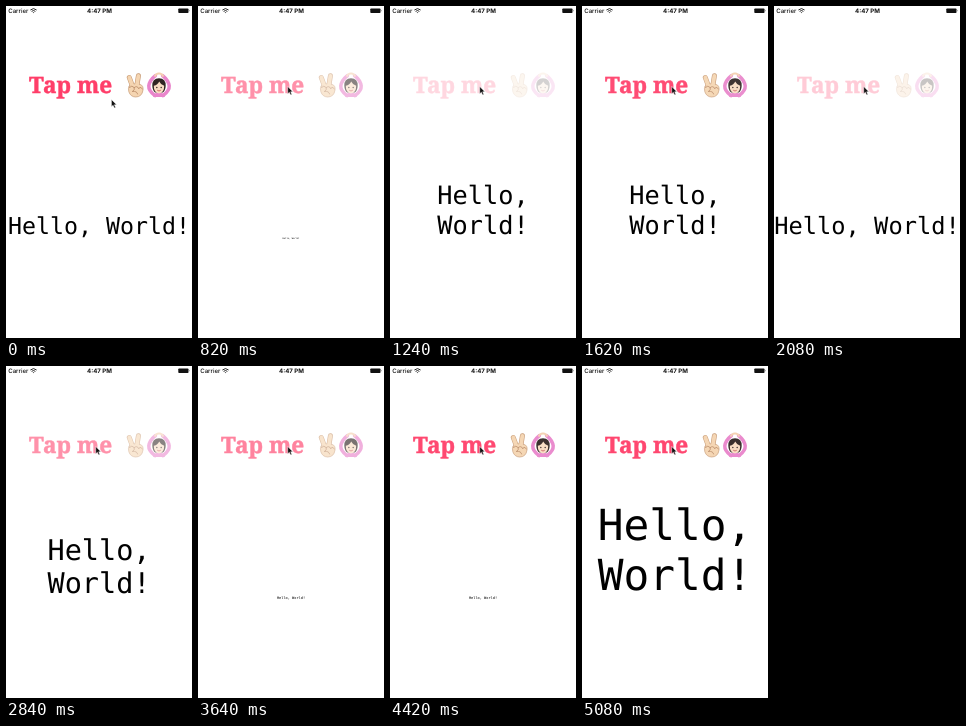
These frames come from a looping animation (186 px wide and 332 px high, 5.1 s). An HTML page:

```html
<!DOCTYPE html>
<html lang="en">
<head>
<meta charset="utf-8">
<title>Tap me</title>
<style>
  html, body { margin: 0; width: 100%; height: 100%; overflow: hidden; background: #fff; }
  svg { display: block; width: 100vw; height: 100vh; }
  text { text-rendering: geometricPrecision; }
  .status { font: 500 6.1px Inter, Roboto, sans-serif; fill: #111; }
  .time { font-weight: 700; text-anchor: middle; }
  .title { font: 800 22.6px "Noto Serif", "Liberation Serif", serif; fill: #ff3e69; stroke: #ff3e69; stroke-width: .5; }
  #label { font-family: "DejaVu Sans Mono", monospace; text-anchor: middle; fill: #000; }
</style>
</head>
<body>
<svg viewBox="0 0 186 332">
  <!-- status bar -->
  <text class="status" x="2.2" y="7">Carrier</text>
  <g fill="none" stroke="#111" stroke-width=".9">
    <path d="M24.4 4a4.6 4.6 0 0 1 6.2 0M25.6 5.4a2.8 2.8 0 0 1 3.8 0"/>
    <path d="M26.7 6.3h1.6l-.8 1z" fill="#111" stroke="none"/>
  </g>
  <text class="status time" x="93.5" y="7">4:47 PM</text>
  <rect x="172.3" y="2.4" width="10.2" height="4.6" rx=".8" fill="#111"/>
  <path d="M183.2 3.8q.9.9 0 1.8z" fill="#111"/>

  <g id="button">
    <text class="title" x="23" y="87">Tap me</text>

    <!-- victory hand -->
    <g stroke-linecap="round" stroke-linejoin="round">
      <g fill="none" stroke="#c69a75" stroke-width="5">
        <path d="M126.4 80L123.3 71.5M130.8 80L132.4 69.8"/>
      </g>
      <path d="M123.2 80Q128 76.5 134 78.4Q137.6 79.4 137 84Q136 91 129.6 91Q124.4 90.8 122.8 85.6Q121.8 82 123.2 80Z"
            fill="#f5d5b1" stroke="#c69a75" stroke-width=".7"/>
      <g fill="none" stroke="#f5d5b1" stroke-width="3.8">
        <path d="M126.6 80.5L123.3 71.5M130.7 80.5L132.4 69.8"/>
      </g>
      <path d="M123.5 81.4Q126 78.7 128.2 81.6Q129.2 84 126.6 85.4M128.2 81.6Q131 79 132.8 82.6M132.8 82Q135.4 80 136.4 83M126.6 85.4Q131 84.8 131.6 88"
            fill="none" stroke="#b98a66" stroke-width=".8"/>
    </g>

    <!-- person with arms overhead -->
    <g>
      <path d="M147.2 91Q147.6 86.4 153 86.4Q158.4 86.4 158.8 91Z" fill="#e985cb"/>
      <path d="M149 89.6Q142.4 84.6 142.8 79.8Q143.6 74.2 149.4 69.6M157 89.6Q163.6 84.6 163.2 79.8Q162.4 74.2 156.6 69.6"
            fill="none" stroke="#e985cb" stroke-width="3.5" stroke-linecap="round"/>
      <path d="M148.6 70.6Q150.2 67.4 153 67.6Q155.8 67.4 157.4 70.6" fill="none" stroke="#f4d0b0" stroke-width="2"/>
      <path d="M146.3 80Q146 72.2 153 72.2Q160 72.2 159.7 80Q159.4 85 156.8 86.4H149.2Q146.6 85 146.3 80Z" fill="#302523"/>
      <path d="M147.8 79.8Q151.8 79 153.2 75.6Q154.8 79 158.2 79.8Q158.3 87 153 87.4Q147.7 87 147.8 79.8Z" fill="#f8dcc2"/>
      <g fill="#3c2c28"><circle cx="150.8" cy="81.4" r=".75"/><circle cx="155.2" cy="81.4" r=".75"/></g>
      <path d="M151.2 84.2Q153 85.8 154.8 84.2" fill="none" stroke="#c4514f" stroke-width=".8"/>
    </g>
  </g>

  <text id="label"></text>

  <path id="cursor" d="M0 0V7.4L1.7 5.9L2.9 8.6L4.2 8L3 5.4H5.2Z" fill="#111" stroke="#fff" stroke-width=".5"/>
</svg>
<script>
  const LOOP = 5100, HOLD = 110, FADE = 470, DIM = 0.2;
  const CENTER = 93, BOTTOM = 233.8, STAGE = 186;

  // release time and font size set by each tap
  const taps = [[600, 2.2], [1240, 25.3], [2000, 23.7], [2620, 28.5], [3390, 3.6], [4030, 3.6], [4680, 42.8]];
  const START_SIZE = 23.25;
  // pointer: time, x, y
  const path = [[0, 105.4, 93.4], [60, 105.4, 93.4], [230, 98, 63], [420, 89.7, 80.4]];

  const $ = id => document.getElementById(id);
  const label = $("label"), button = $("button"), cursor = $("cursor");
  const ease = p => p * p * (3 - 2 * p);
  let shownSize = 0;

  function setSize(size) {
    if (size === shownSize) return;
    shownSize = size;
    const oneLine = 13 * 0.602 * size <= STAGE;
    const lines = oneLine ? ["Hello, World!"] : ["Hello,", "World!"];
    label.setAttribute("font-size", size);
    label.replaceChildren(...lines.map((words, i) => {
      const span = document.createElementNS("http://www.w3.org/2000/svg", "tspan");
      const up = (lines.length - 1 - i) * 1.164 + 0.236;
      span.setAttribute("x", CENTER);
      span.setAttribute("y", BOTTOM - up * size);
      span.textContent = words;
      return span;
    }));
  }

  function pointerAt(t) {
    const next = path.findIndex(k => k[0] > t);
    if (next < 0) return path[path.length - 1].slice(1);
    const [a, b] = [path[next - 1], path[next]];
    const p = ease((t - a[0]) / (b[0] - a[0]));
    return [1, 2].map(i => a[i] + (b[i] - a[i]) * p);
  }

  function draw(t) {
    let size = START_SIZE, alpha = 1;
    for (const [up, next] of taps) {
      if (t < up - HOLD) break;
      alpha = DIM + (1 - DIM) * ease(Math.min(1, Math.max(0, (t - up) / FADE)));
      if (t >= up) size = next;
    }
    setSize(size);
    button.setAttribute("opacity", alpha);
    cursor.setAttribute("transform", `translate(${pointerAt(t)})`);
  }

  const begin = performance.now();
  function tick() {
    draw((performance.now() - begin) % LOOP);
    requestAnimationFrame(tick);
  }
  tick();
</script>
</body>
</html>
```
